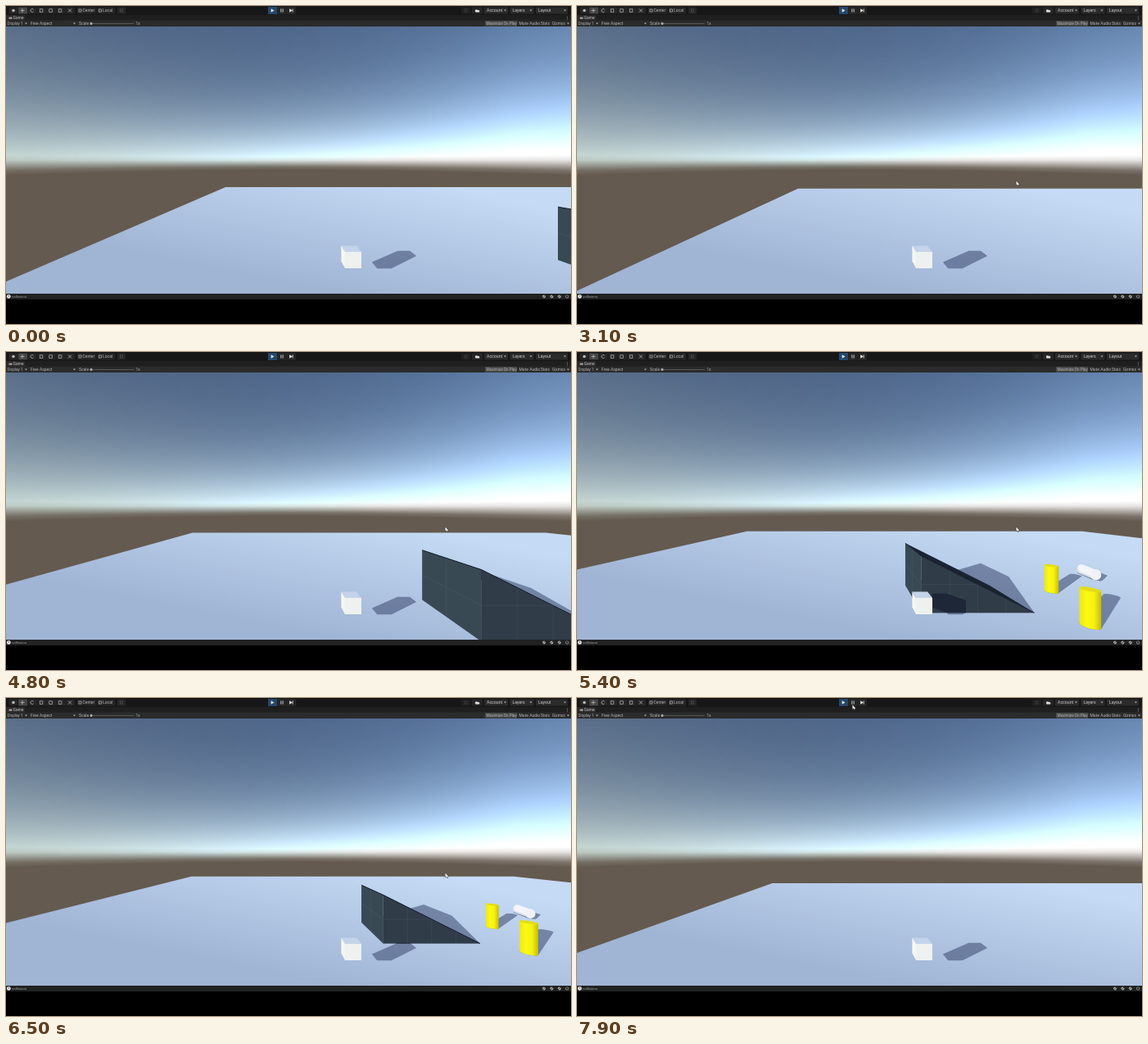
An HTML page with a canvas that plays this animation: 690x388 px, repeating every 8000 ms.

```html
<!DOCTYPE html>
<html lang="en">
<head>
<meta charset="utf-8">
<style>
html, body { margin: 0; width: 100%; height: 100%; overflow: hidden; background: #000; }
canvas { display: block; }
</style>
</head>
<body>
<canvas id="stage" width="690" height="388"></canvas>
<script>
const c = document.getElementById('stage').getContext('2d');
const LOOP = 8000, STEP = 100;
const VIEW = { top: 25, bottom: 351, w: 690 };
const FOCAL = 282, CX = 345, CY = 188, EYE = 6.6;
const SUN = { x: 2.9, z: 2.1 };   // ground shift of a shadow per unit of height

const clamp = u => Math.max(0, Math.min(1, u));
const lerp = (a, b, u) => a + (b - a) * u;
const linear = u => u;
const smooth = u => u * u * (3 - 2 * u);
const speedUp = u => u * u;
const slowDown = u => u * (2 - u);

// Each leg: end time, end position, easing. The first entry is the start.
const RAMP_PATH = [
  [2000, 17.85, 15.3],
  [3900, 19.7, 10.7, linear],
  [5400, 3.83, 19.3, smooth],
  [6100, 5.57, 23, smooth],
  [7000, 12.05, 16.4, speedUp],
  [7900, 14.7, 8, slowDown]];
const POINTER_PATH = [
  [2200, 590, 176],
  [3100, 537, 213, smooth],
  [7250, 537, 213, linear],
  [7800, 337, 8, smooth]];

function along(path, t) {
  let [time, x, y] = path[0];
  for (const [end, ex, ey, ease] of path.slice(1)) {
    const u = ease(clamp((t - time) / (end - time)));
    if (t < end) return [lerp(x, ex, u), lerp(y, ey, u)];
    [time, x, y] = [end, ex, ey];
  }
  return [x, y];
}

function trace(points) {
  c.beginPath();
  points.forEach(p => c.lineTo(...p));
}
function poly(points, fill) {
  trace(points);
  c.fillStyle = fill;
  c.fill();
}
function stroke(points, color, width = .8) {
  trace(points);
  c.strokeStyle = color;
  c.lineWidth = width;
  c.stroke();
}
function box(x, y, w, h, fill) {
  c.fillStyle = fill;
  c.fillRect(x, y, w, h);
}
function dot(x, y, r, fill) {
  c.beginPath();
  c.arc(x, y, r, 0, 7);
  c.fillStyle = fill;
  c.fill();
}
function frameBox(x, y, size, color) {
  c.strokeStyle = color;
  c.lineWidth = .7;
  c.strokeRect(x, y, size, size);
}
function label(s, x, y, size = 4.7, color = '#b4b4b4') {
  c.font = size + 'px Roboto, Inter, sans-serif';
  c.textBaseline = 'middle';
  c.fillStyle = color;
  c.fillText(s, x, y);
}
const arrowDown = x => y => poly([[x, y], [x + 3, y], [x + 1.5, y + 2]], '#aaa');

function hull(points) {
  const p = [...points].sort((a, b) => a[0] - b[0] || a[1] - b[1]);
  const half = list => {
    const out = [];
    for (const q of list) {
      while (out.length > 1) {
        const [a, b] = out.slice(-2);
        if ((b[0] - a[0]) * (q[1] - a[1]) > (b[1] - a[1]) * (q[0] - a[0])) break;
        out.pop();
      }
      out.push(q);
    }
    return out.slice(0, -1);
  };
  return [...half(p), ...half(p.reverse())];
}

// Sky: exponential haze above the horizon, fading into brown below it;
// the haze whitens towards the sun on the right.
function skyColor(e, glow) {
  const zenith = [70 + 2 * glow, 91 + 9 * glow, 124 + 18 * glow];
  const haze = [205 + 80 * glow, 222 + 110 * glow, 216 + 160 * glow];
  const ground = [100, 90, 79];
  const fog = Math.exp(Math.min(e, 0) / 55), fade = smooth(clamp((e + 4) / 16));
  return 'rgb(' + zenith.map((v, i) => {
    const air = Math.min(255, lerp(v, haze[i], fog));
    return Math.round(lerp(air, ground[i], fade));
  }) + ')';
}
function makeSky() {
  const sky = document.createElement('canvas');
  [sky.width, sky.height] = [690, 388];
  const g = sky.getContext('2d');
  for (let x = 0; x < VIEW.w; x++) {
    const glow = clamp(x / 620) ** 1.5, bend = Math.hypot(1, (x - CX) / FOCAL);
    const grad = g.createLinearGradient(0, CY - 164 * bend, 0, CY + 36 * bend);
    for (let e = -164; e <= 36; e += 4) grad.addColorStop((e + 164) / 200, skyColor(e, glow));
    g.fillStyle = grad;
    g.fillRect(x, VIEW.top, 1, VIEW.bottom - VIEW.top);
  }
  return sky;
}
const sky = makeSky();

const floorFill = c.createLinearGradient(460, 205, 430, 355);
floorFill.addColorStop(0, '#c5daf4');
floorFill.addColorStop(1, '#a0b4d4');
const SHADE = 'rgba(58,72,108,.55)';

// Projection of a point given relative to the camera
function project([x, y, z]) {
  const f = FOCAL / Math.max(.6, z);
  return [CX + x * f, CY + (EYE - y) * f];
}
const cast = ([x, y, z]) => project([x + SUN.x * y, 0, z + SUN.z * y]);
const castOnWall = (wall, [x, y, z]) => {
  const k = (wall - z) / SUN.z;
  return project([x + SUN.x * k, y - k, wall]);
};
const circle = (x, y, z, r) => Array.from({ length: 20 }, (_, i) => {
  const a = i * Math.PI / 10;
  return [x + r * Math.cos(a), y, z + r * Math.sin(a)];
});

const CUBE = { x: 3.02, y: .82, z: 12.35, size: .876 };
const corner = (i, j, k) =>
  [CUBE.x + i * CUBE.size, CUBE.y + j * CUBE.size, CUBE.z + k * CUBE.size];
const cubeCorners = Array.from({ length: 8 }, (_, n) => corner(n & 1, n >> 1 & 1, n >> 2));

function drawCube() {
  const face = (fill, ...ids) => poly(ids.map(n => project(cubeCorners[n])), fill);
  face('#c3d3e9', 2, 3, 7, 6);
  face('#f5f7f6', 0, 2, 6, 4);
  face('#eef1ef', 0, 1, 3, 2);
}

function drawRamp(at) {
  const w = 7, h = 3.5, d = 5;
  const P = (x, y, z) => project(at(x, y, z));
  const top = P(0, h, -d), foot = P(0, 0, -d), end = P(w, 0, -d), back = P(0, h, 0);
  poly([back, top, end, P(w, 0, 0)], '#1a2331');
  poly([back, top, foot, P(0, 0, 0)], '#394954');
  poly([top, foot, end], '#303c48');

  const grid = 'rgba(110,135,150,.25)';
  for (let i = 1; i < 4; i++)
    stroke([P(i * w / 4, 0, -d), P(i * w / 4, h * (1 - i / 4), -d)], grid, .6);
  stroke([P(0, h / 2, 0), P(0, h / 2, -d), P(w / 2, h / 2, -d)], grid, .6);
  stroke([P(0, 0, -d / 2), P(0, h, -d / 2)], grid, .6);
  stroke([back, top, end], '#17202c', 1);

  // The cube's shadow on the front wall
  const wall = at(0, 0, -d)[2];
  if (wall < CUBE.z + CUBE.size) return;
  c.save();
  trace([top, foot, end]);
  c.clip();
  poly(hull(cubeCorners.map(p => castOnWall(wall, p))), '#1d2738');
  c.restore();
}

function drawPillar([x, , z]) {
  const base = circle(x, 0, z, .43).map(project), lid = circle(x, 2, z, .43).map(project);
  const xs = base.map(p => p[0]);
  const fill = c.createLinearGradient(Math.min(...xs), 0, Math.max(...xs), 0);
  ['#ebe61a', '#fbfa12', '#f6f210', '#c4bc0c'].forEach((color, i) => fill.addColorStop(i / 3, color));
  poly(hull([...base, ...lid]), fill);
  poly(lid, '#e0dc18');
}

function drawPill(ends) {
  const [a, b] = ends.map(project), r = FOCAL * .42 / ends[1][2];
  c.lineCap = 'round';
  stroke([a, b], '#d8dee7', 2 * r);
  stroke([[a[0], a[1] - 1], [b[0], b[1] - 1]], '#f3f5f9', 1.6 * r);
  c.lineCap = 'butt';
  dot(...b, r * 1.15, '#f0f2f6');
}

// Everything but the cube is placed relative to the ramp's far left foot
function drawWorld(rx, rz) {
  const at = (x, y, z) => [x + rx, y, z + rz];
  const left = -33.2, right = 54.3, far = 41, near = 2 - rz;
  const pillars = [at(11, 0, -1.45), at(13.55, 0, -6.5), at(8.9, 0, -6.55)].filter(p => p[2] > 2);
  const pill = [at(17.7, .5, 3.1), at(17.15, .5, 1.2)];

  poly([at(left, 0, far), at(right, 0, far), at(right, 0, near), at(left, 0, near)].map(project), floorFill);

  const shadows = [
    cubeCorners,
    [at(0, 0, 0), at(0, 0, -5), at(7, 0, 0), at(7, 0, -5), at(0, 3.5, 0), at(0, 3.5, -5)],
    ...pillars.map(([x, , z]) => [...circle(x, 0, z, .43), ...circle(x, 2, z, .43)]),
    pill.flatMap(([x, , z]) => [...circle(x, .1, z, .35), ...circle(x, .8, z, .35)])];
  c.filter = 'blur(.5px)';
  shadows.forEach(points => poly(hull(points.map(cast)), SHADE));
  c.filter = 'none';

  drawRamp(at);
  drawPill(pill);
  pillars.forEach(drawPillar);
  drawCube();
}

function drawToolbar() {
  const ink = '#b8b8b8', button = '#262626';
  box(0, 0, 690, 11, '#171717');
  for (let i = 0; i < 7; i++) box(3.5 + i * 11.6, 1.5, 11, 8, i === 1 ? '#464646' : button);
  dot(9, 5.5, 1.8, ink);
  stroke([[17.5, 5.5], [22.5, 5.5]], ink);
  stroke([[20, 3], [20, 8]], ink);
  c.beginPath();
  c.arc(32, 5.5, 2, .6, 5.7);
  c.stroke();
  for (let i = 0; i < 3; i++) frameBox(41.3 + i * 11.5, 3.8, 3.5, ink);
  stroke([[76, 3.5], [80, 7.5]], ink);
  stroke([[80, 3.5], [76, 7.5]], ink);

  ['Center', 'Local'].forEach((s, i) => {
    const x = 87 + i * 24.5;
    box(x, 1.5, 23.5 - i * 2, 8, button);
    frameBox(x + 2, 4, 3, ink);
    label(s, x + 6.5, 5.8, 5, ink);
  });
  box(136, 1.5, 10, 8, button);
  frameBox(139.5, 4, 3, '#555');

  for (let i = 0; i < 3; i++) box(320 + i * 11.5, 1, 11, 9, i ? button : '#24486d');
  const play = x => poly([[x, 3.2], [x, 7.8], [x + 3.8, 5.5]], '#e6e6e6');
  play(323.7);
  play(346.2);
  for (const x of [335.3, 337.6, 349.6]) box(x, 3.4, 1.1, 4.2, ink);

  box(556, 1.5, 11, 8, '#202020');
  frameBox(560, 4, 3, '#444');
  box(569, 1.5, 13, 8, button);
  dot(574.5, 6, 1.7, '#ddd');
  dot(576.7, 6.2, 1.5, '#ddd');
  ['Account', 'Layers', 'Layout'].forEach((s, i) => {
    const x = 584 + i * 31.5, w = i < 2 ? 29 : 39;
    box(x, 1.5, w, 8, '#2b2b2b');
    label(s, x + 3, 5.8, 5.2, '#d0d0d0');
    arrowDown(x + w - 5)(4.6);
  });
}

function drawGameBar() {
  box(0, 11, 690, 7, '#1f1f1f');
  box(0, 11, 23, 7, '#2b2b2b');
  box(0, 17.5, 690, 7.5, '#2b2b2b');
  box(3.5, 13.6, 4, 2.2, '#a0a0a0');
  label('Game', 8.8, 14.8, 4.8, '#c8c8c8');
  for (let i = 0; i < 3; i++) box(685, 12.5 + i * 1.7, .8, .8, '#aaa');
  label('Display 1', 1.5, 21.6);
  label('Free Aspect', 30, 21.6, 5);
  for (const x of [23, 82, 685]) arrowDown(x)(20.5);
  label('Scale', 89, 21.6, 5);
  box(103, 21.1, 53, .7, '#696969');
  dot(104, 21.4, 1.6, '#aaa');
  label('1x', 158.5, 21.6);
  box(585, 18, 39, 6.5, '#4a4a4a');
  label('Maximize On Play', 586.5, 21.6);
  label('Mute Audio', 626.5, 21.6, 5);
  label('Stats', 653, 21.6);
  label('Gizmos', 667, 21.6);
}

function drawStatusBar() {
  box(0, 351, 690, 7, '#222');
  box(0, 358, 690, 30, '#000');
  dot(3.3, 354.4, 2.4, '#eee');
  box(2.9, 352.9, .8, 1.8, '#333');
  label('collisions', 7, 354.6, 4.3, '#a0a0a0');
  for (let i = 0; i < 4; i++) {
    const x = 657 + i * 9.4;
    dot(x, 354.4, 2, '#aaa');
    if (i < 3) stroke([[x - 2, 356], [x + 2, 352.8]], '#222', .7);
    else dot(x, 354.4, 1.3, '#222');
  }
}

function drawPointer(t) {
  if (t < 2100) return;
  const [x, y] = along(POINTER_PATH, t);
  if (t < 2300) {
    dot(x, y, 4, '#2290dc');
    dot(x, y, 1.8, '#d5efff');
    return;
  }
  const arrow = [[0, 0], [0, 6], [1.5, 4.8], [2.8, 7], [3.4, 4.6], [4.3, 4.5], [0, 0]]
    .map(p => [x - .8 + p[0], y + p[1]]);
  poly(arrow, '#fff');
  stroke(arrow, '#222', .5);
}

function frame(now) {
  const t = Math.floor(now % LOOP / STEP) * STEP;
  c.drawImage(sky, 0, 0);
  c.save();
  c.beginPath();
  c.rect(0, VIEW.top, VIEW.w, VIEW.bottom - VIEW.top);
  c.clip();
  drawWorld(...along(RAMP_PATH, t));
  c.restore();
  drawToolbar();
  drawGameBar();
  drawStatusBar();
  drawPointer(t);
  requestAnimationFrame(frame);
}
requestAnimationFrame(frame);
</script>
</body>
</html>
```
